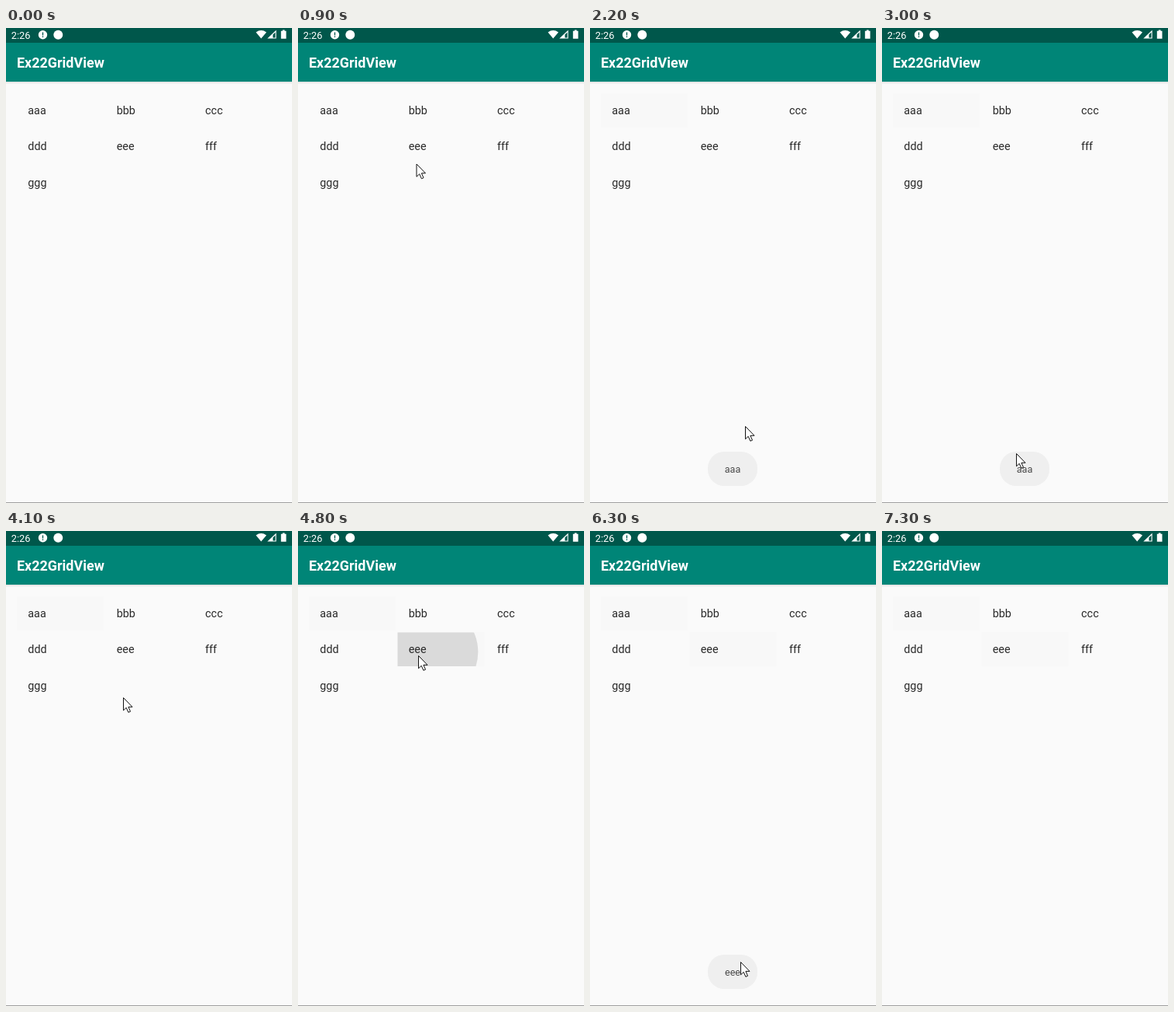
An HTML page for the animation above (8200 ms loop, 369x611 px).

```html
<!DOCTYPE html>
<html lang="en">
<head>
<meta charset="utf-8">
<title>Grid view</title>
<style>
  html, body { margin: 0; width: 100%; height: 100%; overflow: hidden; background: #fafafa; }
  svg { display: block; width: 369px; height: 611px; }
  text { font-family: Roboto, sans-serif; }
  #labels { font-size: 14.36px; fill: #2a2a2a; }
  #toast { font-size: 12.56px; }
</style>
</head>
<body>
<svg viewBox="0 0 369 611">
  <defs>
    <linearGradient id="shade" x2="0" y2="1">
      <stop stop-color="#dcdcdc"/>
      <stop offset="1" stop-color="#fafafa"/>
    </linearGradient>
    <clipPath id="cellClip"><rect id="clipBox" width="112" height="43.5"/></clipPath>
  </defs>

  <rect width="369" height="611" fill="#fafafa"/>
  <rect y="69" width="369" height="3" fill="url(#shade)"/>
  <rect y="19" width="369" height="50" fill="#008577"/>
  <rect width="369" height="19" fill="#00574b"/>
  <rect y="610" width="369" height="1" fill="#a0a0a0"/>

  <g fill="#fff">
    <text x="6.8" y="13.5" font-size="12.8">2:26</text>
    <circle cx="47.5" cy="8.7" r="5.7"/>
    <path d="M47.5 5.6v3.8m0 1.2v1.4" stroke="#00574b" stroke-width="1.3"/>
    <circle cx="67.3" cy="8.7" r="6"/>
    <path d="M322.5 5.4Q329.2.6 336 5.4L329.2 13.6Z"/>
    <path d="M337.2 13.6L348.6 2.8V13.6Z"/>
    <path d="M344.4 8.4L347.5 5.4V12.5H344.4Z" fill="#00574b"/>
    <path d="M354.8 3.8H356.8V2.6H359.6V3.8H361.5V13.7H354.8Z"/>
    <text x="14" y="51" font-size="17.95" font-weight="700">Ex22GridView</text>
  </g>

  <rect id="tintA" x="14" y="84" width="112" height="43.5" fill="#f8f8f8"/>
  <rect id="tintE" x="128.5" y="130.5" width="112" height="43.5" fill="#f8f8f8"/>
  <g clip-path="url(#cellClip)"><circle id="ripple" fill="#dadada"/></g>
  <g id="labels"></g>

  <g id="toast">
    <rect x="152" y="545" width="64" height="44" rx="21" fill="#efefef"/>
    <text id="message" x="184" y="572" text-anchor="middle" fill="#4a4a4a"></text>
  </g>
  <path id="cursor" d="M.5.5V16.8L4.2 13.3L6.9 19.3L9.5 18.2L6.9 12.3H12Z" fill="#fff" stroke="#111" stroke-linejoin="round"/>
</svg>
<script>
const $ = id => document.getElementById(id);
const LOOP = 8200, TICK = 100;
const clamp = (v, lo = 0, hi = 1) => Math.min(hi, Math.max(lo, v));
const mix = (a, b, u) => a + (b - a) * u;
const smooth = u => u * u * (3 - 2 * u);
const accelerate = u => u * u;
const set = (id, attrs) => {
  for (const name in attrs) $(id).setAttribute(name, attrs[name]);
};

$('labels').innerHTML = ['aaa', 'bbb', 'ccc', 'ddd', 'eee', 'fff', 'ggg'].map((word, i) =>
  `<text x="${28.3 + i % 3 * 114.4}" y="${Math.round(110.6 + Math.floor(i / 3) * 46.5)}">${word}</text>`).join('');

// Eased move to a point, bent sideways by bow pixels.
const glide = (x, y, bow = 0, ease = smooth) => ([x0, y0], u) => {
  const e = ease(u), dx = x - x0, dy = y - y0;
  const side = bow * Math.sin(Math.PI * e) / Math.hypot(dx, dy);
  return [x0 + dx * e - dy * side, y0 + dy * e + dx * side];
};

// Inward spiral around a centre.
const spiral = (cx, cy, turn, shrink) => ([x0, y0], u) => {
  const r = Math.hypot(x0 - cx, y0 - cy) * mix(1, shrink, u);
  const angle = Math.atan2(y0 - cy, x0 - cx) + turn * u;
  return [cx + r * Math.cos(angle), cy + r * Math.sin(angle)];
};

// Each leg begins where the one before it ended.
const ENTRY = [322, 150];
const legs = [
  { start: 400, end: 1300, move: glide(43, 110, -50) },
  { start: 1700, end: 2200, move: glide(200, 512, 15) },
  { start: 2200, end: 3000, move: spiral(190, 550, 4.63, 0.44) },
  { start: 3000, end: 3400, move: glide(196, 572) },
  { start: 3400, end: 4100, move: glide(151, 214) },
  { start: 4100, end: 4400, move: glide(155, 160) },
  { start: 4800, end: 5400, move: glide(205, 539) },
  { start: 5400, end: 6300, move: spiral(182, 563, 6.45, 0.45) },
  { start: 6300, end: 6500, move: glide(184, 577) },
  { start: 6500, end: 7300, move: glide(385, 135, 0, accelerate) }
];

const pointerAt = t => legs.filter(leg => t >= leg.start).reduce(
  (tip, { start, end, move }) => move(tip, clamp((t - start) / (end - start))), ENTRY);

const taps = [
  { time: 1600, word: 'aaa', box: [14, 84], touch: [51.5, 110], tint: 'tintA' },
  { time: 4700, word: 'eee', box: [128.5, 130.5], touch: [164, 157], tint: 'tintE' }
];

function draw(t) {
  const shown = t >= 400 && t < 7300;
  set('cursor', {
    visibility: shown ? 'visible' : 'hidden',
    transform: `translate(${pointerAt(t)})`
  });

  for (const tap of taps) set(tap.tint, { opacity: t > tap.time ? 1 : 0 });

  const tap = taps.findLast(p => t >= p.time);
  const age = tap ? t - tap.time : -1;
  set('ripple', { opacity: age < 0 ? 0 : clamp(1 - (age - 100) / 300) });
  set('toast', { opacity: clamp((age - 200) / 300) * clamp((2400 - age) / 300) });
  if (!tap) return;

  const drift = clamp(age / 300);
  const [x, y] = tap.box;
  set('clipBox', { x, y });
  set('ripple', {
    cx: mix(tap.touch[0], x + 56, drift),
    cy: mix(tap.touch[1], y + 21.75, drift),
    r: 36.5 + age * 0.25
  });
  $('message').textContent = tap.word;
}

const origin = performance.now();
function frame() {
  const t = (performance.now() - origin) % LOOP;
  draw(Math.floor(t / TICK) * TICK);
  requestAnimationFrame(frame);
}
frame();
</script>
</body>
</html>
```
